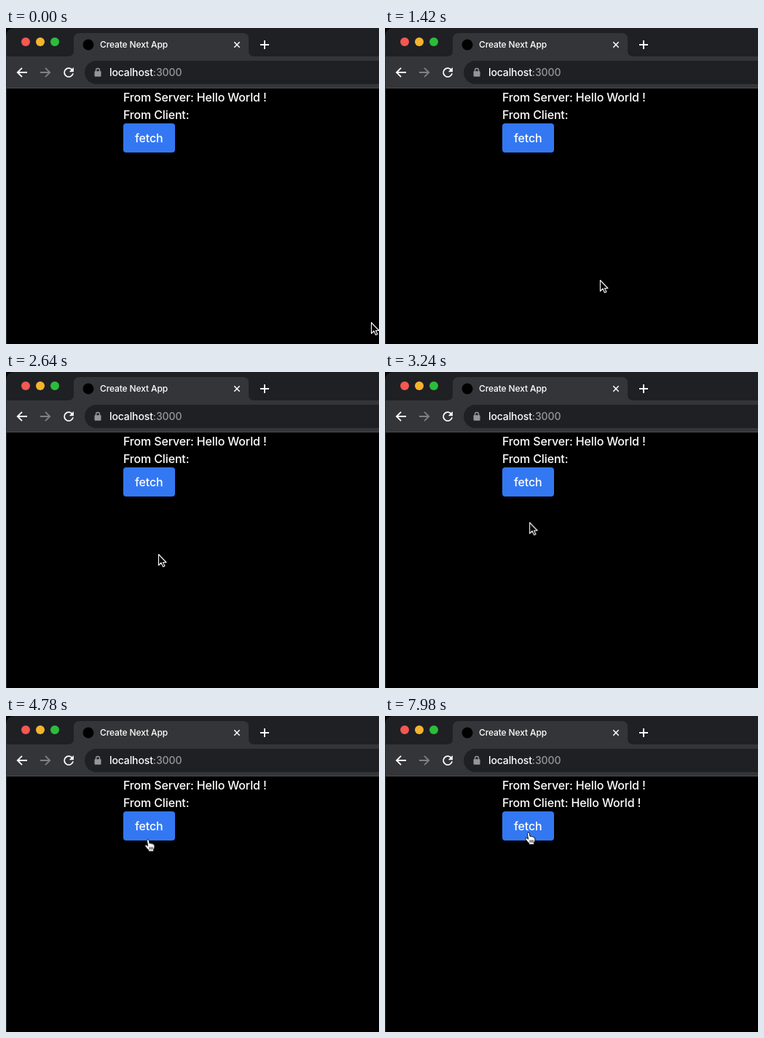
An HTML page that plays this animation: 512 by 434 pixels, repeating every 8000 ms.

```html
<!DOCTYPE html>
<html lang="en">
<head>
<meta charset="utf-8">
<title>Fetch demo</title>
<style>
  html, body { margin: 0; width: 100%; height: 100%; overflow: hidden; background: #000; }
  svg { display: block; width: 100vw; height: 100vh; }
  text { font-family: Inter, Roboto, sans-serif; font-weight: 500; fill: #fff; white-space: pre; }
  .page { font-size: 16px; letter-spacing: -.15px; }
  .title { font-size: 12px; letter-spacing: -.12px; }
  .url { font-size: 14px; letter-spacing: -.12px; }
  .dim { fill: #94969b; }
  .icon { fill: none; stroke: #fff; stroke-width: 1.8; }
  .off { stroke: #7f8185; }
</style>
</head>
<body>
<svg viewBox="0 0 512 434" preserveAspectRatio="none">
  <rect width="512" height="434"/>

  <!-- browser frame -->
  <rect width="530" height="100" rx="10" fill="#1f2024"/>
  <path d="M0 83V39H85Q93 39 93 31V15Q93 7 101 7H325Q333 7 333 15V31Q333 39 341 39H512V83Z" fill="#343538"/>
  <rect x="108" y="45" width="430" height="32" rx="16" fill="#1f2024"/>
  <rect y="83" width="512" height="17"/>
  <path d="M0 82.5H512" stroke="#4a4b4f"/>
  <path d="M.5 10V434" stroke="#2b2b35"/>
  <circle cx="27" cy="19" r="6" fill="#f45850"/>
  <circle cx="47" cy="19" r="6" fill="#f6b42e"/>
  <circle cx="67" cy="19" r="6" fill="#2bbd3b"/>

  <!-- tab -->
  <circle cx="113" cy="23" r="7.5"/>
  <text class="title" x="129" y="27.3">Create Next App</text>
  <path class="icon" style="stroke-width:1.5" d="M313.3 19.3l7.4 7.4m0-7.4l-7.4 7.4"/>
  <path class="icon" d="M355 17v12m-6-6h12"/>

  <!-- toolbar -->
  <path class="icon" d="M29 61H16m6-6.2L15.8 61l6.2 6.2"/>
  <path class="icon off" d="M47 61h13m-6-6.2L60.2 61 54 67.2"/>
  <path class="icon" d="M91.2 58A6 6 0 1 0 92 62.3"/>
  <path d="M92.9 54v6.2h-6.2Z" fill="#fff"/>
  <rect x="121.5" y="59.2" width="9" height="7.5" rx="1" fill="#94969b"/>
  <path d="M123.5 60v-2a2.5 2.5 0 0 1 5 0v2" fill="none" stroke="#94969b" stroke-width="1.4"/>
  <text class="url" x="142" y="66">localhost<tspan class="dim">:3000</tspan></text>

  <!-- page -->
  <g class="page">
    <text x="161" y="101">From Server: Hello World !</text>
    <text x="161" y="125">From Client:<tspan id="reply"> Hello World !</tspan></text>
    <rect x="161" y="131" width="71" height="40" rx="4" fill="#3378f2"/>
    <text x="177" y="157">fetch</text>
  </g>

  <g id="cursor">
    <path id="arrow" d="M.5-.5v15L4 11l2.5 5.5L9 15.5 6.5 10.5H11Z"
      fill="#000" stroke="#fff" stroke-width="1.1" stroke-linejoin="round"/>
    <g id="hand" stroke="#000" stroke-width=".9" stroke-linejoin="round">
      <path fill="#fff" d="M-1.6 1.4Q-1.4 0 -.2 0T1.3 1.4L2 5.4Q3.6 4.5 4.4 5.9
        Q6 5.1 6.8 6.6Q8.7 6.2 8.8 8.2L8.9 10.3Q8.7 12.5 7.6 13.7V16.4H.7V14.7
        Q-1.8 12.6 -3.9 9.5Q-4.6 7.9 -3.3 7.4Q-2 7.2 -.4 9.2Z"/>
      <path fill="none" d="M2.1 10.3v3.6m2.1-3.6v3.6m2-3.6v3.6"/>
    </g>
  </g>
</svg>
<script>
  const LOOP = 8000, HOVER = 4180, REPLY = 7000;

  const play = (id, frames) => document.getElementById(id)
    .animate(frames, { duration: LOOP, iterations: Infinity });

  // pointer tip at a time, with the easing towards the next stop
  const stop = (time, x, y, easing = 'linear') =>
    ({ offset: time / LOOP, transform: `translate(${x}px, ${y}px)`, easing });

  const swap = (id, property, time, before, after) => play(id, [
    { [property]: before, offset: 0, easing: 'step-end' },
    { [property]: after, offset: time / LOOP },
    { [property]: after, offset: 1 }
  ]);

  play('cursor', [
    stop(0, 501, 405),
    stop(840, 499, 416, 'ease-out'),
    stop(1420, 295, 347),
    stop(2640, 209, 251, 'ease-out'),
    stop(3940, 192, 183),
    stop(HOVER, 194, 171),
    stop(4780, 195, 169.5, 'ease-out'),
    stop(5700, 197, 160),
    stop(LOOP, 197, 160)
  ]);
  swap('arrow', 'opacity', HOVER, 1, 0);
  swap('hand', 'opacity', HOVER, 0, 1);
  swap('reply', 'fillOpacity', REPLY, 0, 1);
</script>
</body>
</html>
```
